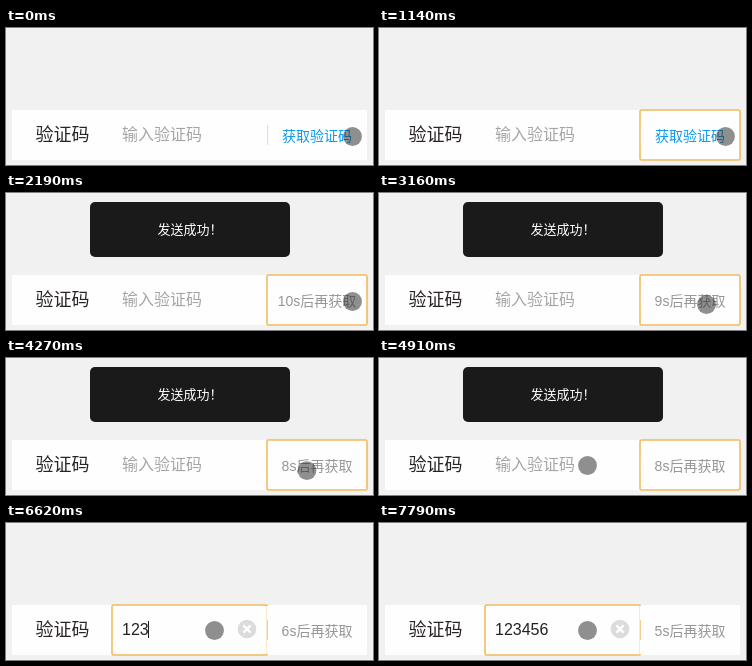
An HTML page with a canvas that plays this animation: 367 by 137 pixels, repeating every 8 s.

```html
<!DOCTYPE html>
<html lang="zh-CN">
<head>
<meta charset="utf-8">
<title>验证码</title>
<style>
  html, body { margin: 0; width: 100%; height: 100%; overflow: hidden; background: #f1f1f1; }
  canvas { display: block; }
</style>
</head>
<body>
<canvas id="stage" width="367" height="137"></canvas>
<script>
const ctx = document.getElementById('stage').getContext('2d');
const LOOP = 8000;
const FONT = '"Liberation Sans", "Noto Sans CJK SC", "Noto Sans CJK", sans-serif';
const ORANGE = '#f1bc5e';
const PRESS = 1140, SENT = 2190, TOAST_END = 5210, FOCUS = 5520;
const SECOND = 970;

const clamp = (v, lo, hi) => Math.min(hi, Math.max(lo, v));
const within = (t, from, to) => t >= from && t < to;
const progress = (t, from, to) => clamp((t - from) / (to - from), 0, 1);
const easeOut = p => 1 - (1 - p) ** 3;
const easeInOut = p => p * p * (3 - 2 * p);

function text(str, x, y, size, color, align = 'left', weight = 300) {
  ctx.font = `${weight} ${size}px ${FONT}`;
  ctx.textAlign = align;
  ctx.fillStyle = color;
  ctx.fillText(str, x, y);
}

function rect(x, y, w, h, color) {
  ctx.fillStyle = color;
  ctx.fillRect(x, y, w, h);
}

function disc(x, y, r, color) {
  ctx.beginPath();
  ctx.arc(x, y, r, 0, Math.PI * 2);
  ctx.fillStyle = color;
  ctx.fill();
}

function focusRing(x, w) {
  ctx.beginPath();
  ctx.roundRect(x, 82, w, 50, 1.5);
  ctx.strokeStyle = ORANGE;
  ctx.lineWidth = 1.6;
  ctx.stroke();
}

function toast() {
  ctx.beginPath();
  ctx.roundRect(84, 9, 200, 55, 5);
  ctx.fillStyle = '#1a1a1a';
  ctx.fill();
  text('发送成功！', 151.5, 41, 13, '#fff', 'left', 400);
}

function clearIcon(x, y) {
  disc(x, y, 9.3, '#dcdcdc');
  ctx.beginPath();
  for (const s of [-1, 1]) {
    ctx.moveTo(x - 3.6, y - 3.6 * s);
    ctx.lineTo(x + 3.6, y + 3.6 * s);
  }
  ctx.strokeStyle = '#fff';
  ctx.lineWidth = 2.2;
  ctx.stroke();
}

// Digits arrive in two quick bursts of three.
const burst = (t, from) => clamp(Math.floor((t - from) / 140) + 1, 0, 3);

function input(t) {
  const value = '123456'.slice(0, burst(t, 6340) + burst(t, 7000));
  if (t >= FOCUS) {
    focusRing(106, 155.5);
    rect(261, 83, 2, 48, '#fefefe');
    clearIcon(241, 106);
  }
  if (value) text(value, 116, 112, 16, '#222', 'left', 400);
  else text('输入验证码', 116, 112, 16, '#a5a5a5');
  if (within(t, FOCUS, 6070) || within(t, 6340, 7790)) {
    rect(116 + Math.floor(value.length * 8.9), 98, 1, 17, '#222');
  }
}

function button(t) {
  if (within(t, PRESS, FOCUS)) focusRing(261, 100);
  rect(261, 97, 1, 20, t < PRESS ? '#ddd' : '#f3cf8e');
  const left = 10 - Math.floor((t - SENT) / SECOND);
  const label = t < SENT ? '获取验证码' : `${left}s后再获取`;
  text(label, 311, 113, 14, t < 1270 ? '#0a9bf0' : '#969696', 'center');
}

// A short drift off the button edge, then a shallow sweep to the input.
function pointer(t) {
  const drift = easeOut(progress(t, 2250, 3040));
  const sweep = easeInOut(progress(t, 3300, 4860) ** 2.5);
  const x = 346.5 - 19 * drift - 119 * sweep;
  const y = 108.5 + 3 * drift - 4 * sweep + 3 * Math.sin(Math.PI * sweep);
  disc(x, y, 9.4, 'rgba(40,40,40,0.52)');
}

function draw(t) {
  rect(0, 0, 367, 137, '#f1f1f1');
  rect(6, 82, 355, 50, '#fefefe');
  text('验证码', 29.5, 113, 18, '#2a2428');
  input(t);
  button(t);
  if (within(t, SENT, TOAST_END)) toast();
  pointer(t);
}

const start = performance.now();
function tick() {
  draw((performance.now() - start) % LOOP);
  requestAnimationFrame(tick);
}
tick();
</script>
</body>
</html>
```
